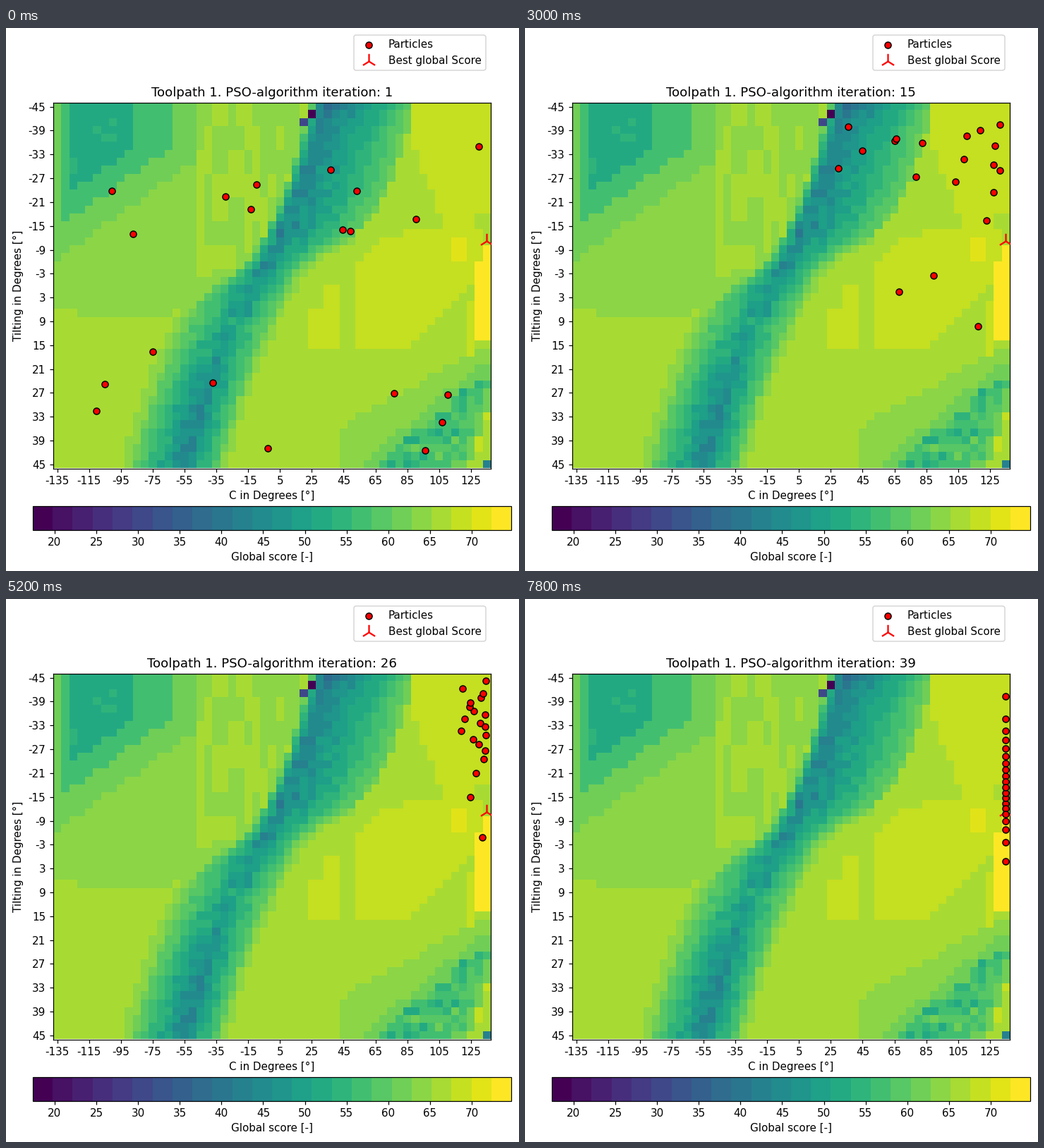
These frames come from a looping animation (727x770 px, 8 s). A matplotlib script:

```python
import matplotlib.pyplot as plt
import numpy as np
from matplotlib.animation import FuncAnimation

W, H, DPI = 727, 770, 128
PT = 109 / DPI                      # text and line scale
LEFT, RIGHT, TOP, BOTTOM = 67, 687, 106, 624.5
COLS, ROWS, LEVELS = 55, 46, 24
VMIN, VMAX = 17.38, 74.74
CELL = (RIGHT - LEFT) / COLS
WALL = COLS - 1                     # last column, where the swarm ends up

# levels of the broad areas
GREEN, LIME, PLATEAU, GOLD, YELLOW = 19, 20, 21, 22, 23

plt.rcParams.update({
    "font.family": "DejaVu Sans", "font.size": 10 * PT,
    "axes.titlesize": 12 * PT, "axes.titlepad": 6 * PT,
    "axes.labelpad": 4 * PT, "axes.linewidth": 0.8 * PT,
    "legend.fontsize": 10 * PT, "patch.linewidth": PT,
})
for axis in ("xtick", "ytick"):
    plt.rcParams.update({f"{axis}.major.size": 3.5 * PT,
                         f"{axis}.major.pad": 3.5 * PT,
                         f"{axis}.major.width": 0.8 * PT})

# ---- score map: c is the column, r the row of every cell ------------------
rng = np.random.default_rng(7)
r, c = np.mgrid[:ROWS, :COLS].astype(float)
grid = np.full((ROWS, COLS), float(LIME))


def step_up(v):
    return 1 / (1 + np.exp(-v))


def box(level, c0, c1, r0, r1):
    grid[r0:r1, c0:c1] = level


def streaks(run, share):
    """Vertical runs of cells covering about the given share."""
    runs = rng.random((ROWS // run + 1, COLS)) < share
    return np.repeat(runs, run, axis=0)[:ROWS]


mid = 33.5 - 0.39 * r + 0.8 * np.sin(np.pi * r / 22)


def left_side():
    grid[(c < mid) & (r < 26)] = GREEN
    box(GREEN, 3, 15, 26, 27)
    box(LIME, 18, 19, 6, 22)
    grid[(c > 18) & (c < mid) & (r < 22) & streaks(3, 0.45)] = LIME
    slope = c + 1.4 * r
    for k, (reach, cap) in enumerate([(27, 18), (21.5, 15), (16.8, 10)]):
        grid[(slope < reach) & (c < cap) & (c >= k)] = 18 - 2 * k
    rough = (grid == 14) & (c < 8) & (r > 1) & (rng.random(c.shape) < 0.25)
    grid[rough] = 15


def plateaus():
    grid[(c > 43 + 0.37 * r) & (r < 16)] = PLATEAU
    box(LIME, 53, 55, 14, 18)
    start = 37 + 7 * np.exp((16 - r) / 1.7)
    grid[(c >= start) & (c < np.minimum(75 - r, WALL))
         & (r >= 16) & (r < 31)] = PLATEAU
    box(PLATEAU, 34, 36, 23, 31)
    box(PLATEAU, 32, 34, 26, 31)
    box(PLATEAU, 52, 53, 25, 32)
    box(GOLD, 50, 52, 17, 20)
    box(YELLOW, 53, 55, 20, 30)
    box(YELLOW, 54, 55, 18, 20)


def bottom_right_hill():
    limit = 55 - 0.35 * (r - 33)
    steep, flat = c + 1.8 * r, c + 1.2 * r
    grid[(steep > 108) & (c >= 36) & (r > 30)] = GREEN
    grid[(flat > 92) & (c < limit + 1) & (r > 32)] = 18
    core = (flat > 94) & (c < limit) & (r > 34)
    grid[core] = rng.normal(16, 1, c.shape)[core]
    shore = (c >= limit + 1) & (r > 34)
    grid[shore] = np.where(streaks(2, 0.5), PLATEAU, LIME)[shore]
    box(10, 54, 55, 45, 46)


def valley():
    left = 1.7 + 5 * step_up((r - 22) / 1.5)
    right = 4.6 + 6.8 * step_up((17.5 - r) / 1.2)
    t = np.where(c < mid, (mid - c) / left, (c - mid) / right)
    saddle = 2.5 * np.exp(-((r - 28) / 6) ** 2) - 2.5 * np.exp(-r / 1.5)
    noise = rng.normal(0, 0.8, c.shape)
    depth = 10.5 + 7.5 * t + (saddle + noise) * (1 - t)
    grid[(t < 1.2) & (r > 16) & (grid != PLATEAU)] = GREEN
    grid[t < 1] = depth[t < 1]
    box(0, 32, 33, 1, 2)
    box(5, 31, 32, 2, 3)


for part in (left_side, plateaus, bottom_right_hill, valley):
    part()
score = VMIN + (grid.round() + 0.5) / LEVELS * (VMAX - VMIN)

# ---- swarm: start and end of the free flight, in stage pixels -------------
FLIGHTS = [
    (670, 169, 669, 168), (460, 202, 493, 190), (150, 232, 432, 189),
    (355, 223, 358, 202), (311, 240, 326, 168), (347, 258, 480, 252),
    (497, 232, 658, 191), (581, 272, 593, 184), (477, 287, 668, 239),
    (488, 289, 568, 258), (180, 293, 435, 188), (208, 460, 304, 237),
    (140, 506, 441, 502), (128, 544, 624, 173), (293, 504, 655, 281),
    (371, 597, 519, 495), (550, 519, 588, 222), (626, 521, 639, 351),
    (618, 560, 654, 233), (594, 600, 620, 532),
]
first, last = np.hsplit((np.array(FLIGHTS) - [73.1, 112.6] * 2) / CELL, 2)
FLIGHT_END, PERCHED, SETTLED = 10, 23, 39

# each particle keeps its rank in height, from 0 (top) to 1
rank = last[:, 1].argsort().argsort() / (len(last) - 1)
perch = 8.4 * rank + 11 * rank ** 12
rest = 2.3 + 16.9 * rank ** 0.6 + 3.9 * rank ** 12


def lerp(a, b, u):
    return a + (b - a) * u


def swarm(step):
    if step <= FLIGHT_END:
        return lerp(first, last, (step - 1) / (FLIGHT_END - 1))
    gap = max(0, 1 - (step - FLIGHT_END) / 22) ** 1.8
    x = lerp(WALL, last[:, 0], gap)
    if step < PERCHED:
        u = (step - FLIGHT_END) / (PERCHED - FLIGHT_END)
        y = lerp(last[:, 1], perch, 1 - (1 - u) ** 1.6)
    else:
        y = lerp(perch, rest, (step - PERCHED) / (SETTLED - PERCHED))
    return np.column_stack([x, y])


# ---- figure ---------------------------------------------------------------
def stage_axes(x0, y0, x1, y1):
    return fig.add_axes([x0 / W, 1 - y1 / H, (x1 - x0) / W, (y1 - y0) / H])


fig = plt.figure(figsize=(W / DPI, H / DPI), dpi=DPI, facecolor="white")
ax = stage_axes(LEFT, TOP, RIGHT, BOTTOM)
image = ax.imshow(score, cmap=plt.get_cmap("viridis", LEVELS), vmin=VMIN,
                  vmax=VMAX, aspect="auto", interpolation="nearest")
ax.set_xticks(range(0, COLS, 4), [str(v) for v in range(-135, 136, 20)])
ax.set_yticks(range(0, ROWS, 3), [str(v) for v in range(-45, 46, 6)])
ax.set_xlabel("C in Degrees [°]")
ax.set_ylabel("Tilting in Degrees [°]")
title = ax.set_title("")

dots = ax.scatter(*first.T, s=36 * PT ** 2, c="red", edgecolors="black",
                  linewidths=PT, zorder=4, label="Particles")
best = ax.scatter([WALL], [16.9], s=200 * PT ** 2, c="red", marker="2",
                  linewidths=1.5 * PT, zorder=3, label="Best global Score")
ax.set_xlim(-0.5, COLS - 0.5)
ax.set_ylim(ROWS - 0.5, -0.5)
ax.legend(handles=[dots, best], loc="upper right", borderaxespad=0,
          bbox_to_anchor=(679.5 / W, 1 - 10 / H),
          bbox_transform=fig.transFigure)

bar = fig.colorbar(image, cax=stage_axes(38, 678, 716, 711.5),
                   orientation="horizontal", ticks=range(20, 71, 5))
bar.set_label("Global score [-]")


def draw(i):
    step = max(1, i)
    dots.set_offsets(swarm(step))
    title.set_text(f"Toolpath 1. PSO-algorithm iteration: {step}")
    return dots, title


anim = FuncAnimation(fig, draw, frames=40, interval=200, repeat=True,
                     repeat_delay=0, init_func=lambda: draw(0), blit=False)
plt.show()
```
